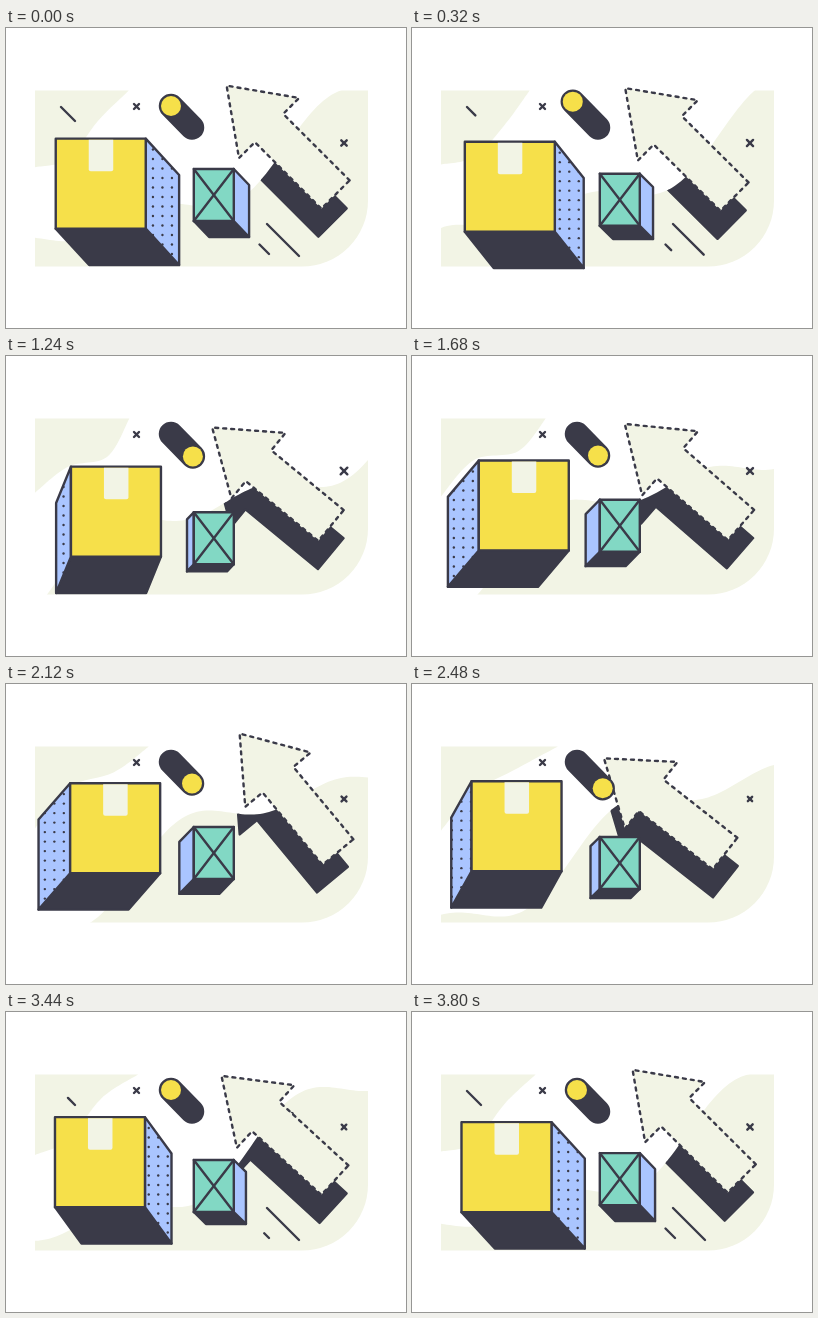
Animation of 400x300 px, one loop 3840 ms. Source, as an HTML page with a canvas:

```html
<!DOCTYPE html>
<html>
<head>
<meta charset="utf-8">
<style>
  html, body { margin: 0; width: 100%; height: 100%; overflow: hidden; background: #fff; }
  canvas { display: block; width: 400px; height: 300px; }
</style>
</head>
<body>
<canvas id="stage" width="400" height="300"></canvas>
<script>
const LOOP = 3840, TAU = 2 * Math.PI;
const LEFT = 29, TOP = 62.5, RIGHT = 362, BOTTOM = 238.5, WIDTH = RIGHT - LEFT;
const DARK = '#3a3a48', LIGHT = '#f2f4e5', YELLOW = '#f6e04a', BLUE = '#aac5ff', TEAL = '#82d8c4';
const ctx = document.getElementById('stage').getContext('2d');

// Arrow poses: time, tail x, tail y, angle
const ARROW_POSES = [
  [0, 329.5, 166.5, 45],
  [640, 316, 171, 43.5],
  [1240, 325, 169.5, 39.5],
  [1680, 329, 169, 41],
  [2120, 332, 168, 50.3],
  [2280, 322, 168.5, 43],
  [2480, 313, 169.5, 38.2],
  [3080, 325, 170, 40]
];

// Looping cubic curve through the poses.
function sample(poses, t) {
  const n = poses.length;
  const pose = i => poses[(i + n) % n];
  const time = i => pose(i)[0] + Math.floor(i / n) * LOOP;
  let i = n - 1;
  while (poses[i][0] > t) i--;
  const span = time(i + 1) - time(i), u = (t - time(i)) / span, w = 1 - u;
  return pose(i).slice(1).map((a, k) => {
    const value = j => pose(j)[k + 1];
    const slope = j => (value(j + 1) - value(j - 1)) / (time(j + 1) - time(j - 1)) * span;
    return w * w * (1 + 2 * u) * a + u * u * (3 - 2 * u) * value(i + 1)
      + u * w * w * slope(i) - u * u * w * slope(i + 1);
  });
}

const wave = (t, peak) => Math.cos((t - peak) / LOOP * TAU);
const ramp = (t, from, span) => Math.min(1, Math.max(0, (t - from) / span));

// Pulls back before moving and overshoots at the end.
function backEase(u, pull = 4.5) {
  if (u > 0.5) return 1 - backEase(1 - u, pull);
  const v = 2 * u;
  return v * v * ((pull + 1) * v - pull) / 2;
}

function polygon(points, fill, stroke = true) {
  ctx.beginPath();
  points.forEach(p => ctx.lineTo(...p));
  ctx.closePath();
  ctx.fillStyle = fill;
  ctx.fill();
  if (stroke) ctx.stroke();
}

function line(x1, y1, x2, y2) {
  ctx.beginPath();
  ctx.moveTo(x1, y1);
  ctx.lineTo(x2, y2);
  ctx.stroke();
}

function disc(x, y, r, fill) {
  ctx.beginPath();
  ctx.arc(x, y, r, 0, TAU);
  ctx.fillStyle = fill;
  ctx.fill();
}

// Adds a smooth curve through the points to the current path.
function curve(p) {
  ctx.lineTo(...p[0]);
  for (let i = 0; i < p.length - 1; i++) {
    const a = p[i], b = p[i + 1], before = p[i - 1] || a, after = p[i + 2] || b;
    ctx.bezierCurveTo(
      a[0] + (b[0] - before[0]) / 6, a[1] + (b[1] - before[1]) / 6,
      b[0] - (after[0] - a[0]) / 6, b[1] - (after[1] - a[1]) / 6, ...b);
  }
}

// A rising slope with a steep step that travels one panel width per loop.
function hillHeight(x, t) {
  const phase = ((x - 279) / WIDTH - t / LOOP) * TAU;
  return 245 - 0.45 * x - 22 * Math.sin(phase) - 15 * Math.sin(2 * phase);
}

function hillPath(t) {
  ctx.beginPath();
  ctx.moveTo(LEFT, 300);
  for (let x = LEFT; x <= RIGHT; x += 3) ctx.lineTo(x, hillHeight(x, t));
  ctx.lineTo(RIGHT, 300);
  ctx.closePath();
}

function drawCorner(t) {
  ctx.beginPath();
  ctx.moveTo(LEFT, TOP);
  curve([
    [131 + 15 * wave(t, 2530), TOP],
    [100 + 8 * wave(t, 2100), 92 + 10 * wave(t, 925)],
    [62, 117 + 14 * wave(t, 0)],
    [LEFT, 141 + 6 * wave(t, 2690)]
  ]);
  ctx.fillStyle = LIGHT;
  ctx.fill();
}

// The shadow only falls on the hill.
function drawHillAndArrow(t) {
  const [x, y, angle] = sample(ARROW_POSES, t);
  const shape = [[0, -20], [-94, -20], [-94, -42.5], [-154, 0], [-94, 42.5], [-94, 20], [0, 20]];
  const place = () => { ctx.translate(x, y); ctx.rotate(angle * Math.PI / 180); };
  ctx.save();
  ctx.beginPath();
  ctx.roundRect(LEFT, TOP, WIDTH, BOTTOM - TOP, [0, 0, 66, 0]);
  ctx.clip();
  hillPath(t);
  ctx.fillStyle = LIGHT;
  ctx.fill();
  ctx.clip();
  place();
  ctx.translate(17.7, 21.9);
  polygon(shape, DARK);
  ctx.restore();

  ctx.save();
  place();
  ctx.setLineDash([3, 5]);
  polygon(shape, LIGHT);
  ctx.restore();
}

function drawBox(x, y, w, h, dx, dy, color, dotted) {
  const r = x + w, b = y + h, edge = dx > 0 ? r : x;
  const side = [[edge, y], [edge + dx, y + dy], [edge + dx, b + dy], [edge, b]];
  polygon([[x, b], [r, b], [r + dx, b + dy], [x + dx, b + dy]], DARK);
  polygon(side, BLUE);
  if (dotted) {
    ctx.save();
    ctx.clip();
    for (let i = -1; i <= 1; i++)
      for (let j = -6.5; j <= 6.5; j++)
        disc(edge + dx / 2 + i * 9.5, y + (h + dy) / 2 + j * 9.5, 1.2, DARK);
    ctx.restore();
  }
  polygon([[x, y], [r, y], [r, b], [x, b]], color);
}

function drawBoxes(t) {
  const turn = wave(t, 0), tilt = turn * turn;
  const x = 57.8 + 9 * wave(t, 1640), y = 106 + 8.8 * wave(t, 620);
  drawBox(x, y, 90, 90, 33.4 * turn, 36.3, YELLOW, true);
  ctx.beginPath();
  ctx.roundRect(x + 33, y + 1, 24.5, 31.5, [0, 0, 2, 2]);
  ctx.fillStyle = LIGHT;
  ctx.fill();

  const sx = 187.8, sy = 160 - 19 * tilt;
  drawBox(sx, sy, 40, 52, 15.3 * turn, 5 + 11 * tilt, TEAL);
  line(sx, sy, sx + 40, sy + 52);
  line(sx + 40, sy, sx, sy + 52);
}

// The knob stretches its track when it swings past either end.
function drawSwitch(t) {
  const s = backEase(ramp(t, 36, 1304)) - backEase(ramp(t, 2128, 1304));
  const at = u => [165 + 21 * u, 78 + 21.5 * u];
  ctx.save();
  ctx.lineWidth = 24.5;
  line(...at(Math.min(0, s)), ...at(Math.max(1, s)));
  ctx.restore();
  disc(...at(s), 10, YELLOW);
}

function drawCross(x, y, r) {
  line(x - r, y - r, x + r, y + r);
  line(x + r, y - r, x - r, y + r);
}

// A diagonal line that retracts to its start, then grows back from its end.
function drawStreak(t, x, y, length, hideAt, showAt, span) {
  const end = length * (1 - ramp(t, hideAt, span));
  const start = length * (1 - ramp(t, showAt, span));
  if (end > 0) line(x, y, x + end, y + end);
  else if (start < length) line(x + start, y + start, x + length, y + length);
}

function draw() {
  const t = performance.now() % LOOP;
  ctx.fillStyle = '#fff';
  ctx.fillRect(0, 0, 400, 300);
  ctx.strokeStyle = DARK;
  ctx.lineWidth = 2.4;
  ctx.lineCap = ctx.lineJoin = 'round';

  drawCorner(t);
  drawHillAndArrow(t);
  drawStreak(t, 55, 79, 14, 160, 3240, 400);
  drawStreak(t, 261, 196, 32, 300, 2880, 520);
  drawStreak(t, 253.5, 216.5, 9.5, 160, 3240, 400);
  drawBoxes(t);
  drawSwitch(t);
  drawCross(130.5, 78.5, 2.5);
  drawCross(338, 115, 2.7 + 0.7 * wave(t, 950));
  requestAnimationFrame(draw);
}
draw();
</script>
</body>
</html>
```
